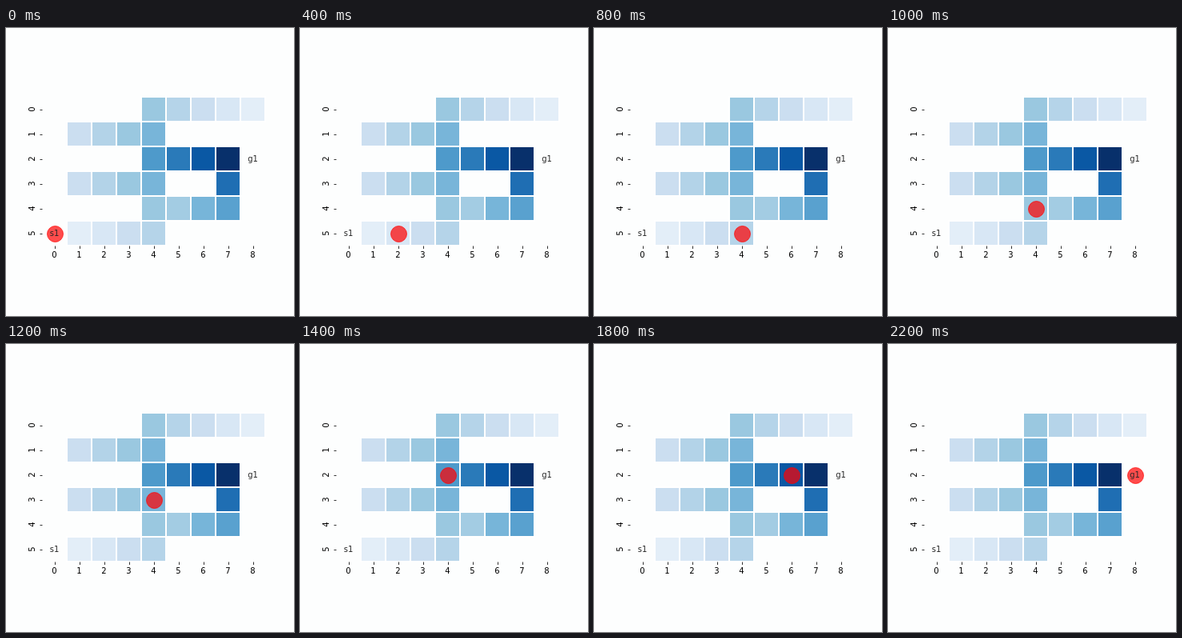
An HTML page for the animation above (2400 ms loop, 360 by 360 pixels).

```html
<!DOCTYPE html>
<html>
<head>
<meta charset="utf-8">
<style>
html, body { margin: 0; width: 100%; height: 100%; overflow: hidden; background: #fdfefe; }
svg { display: block; width: 360px; height: 360px; }
text { font: 10px "DejaVu Sans", sans-serif; text-anchor: middle; }
</style>
</head>
<body>
<svg viewBox="0 0 360 360">
  <g id="grid"></g>
  <circle id="agent" r="10" fill="#f00" fill-opacity=".7" stroke="#f00" stroke-opacity=".7"/>
  <g id="labels"></g>
</svg>
<script>
const CELL = 31, LEFT = 45, TOP = 86, STEP = 200;
const midX = c => LEFT + (c + 0.5) * CELL;
const midY = r => TOP + (r + 0.5) * CELL;

// Each row: first column, then the cell colours
const rows = [
  [4, '#9ac8e0', '#b5d4e9', '#cbdef0', '#d8e7f5', '#e3eef8'],
  [1, '#cbdef0', '#b3d3e8', '#9ac8e0', '#78b5d9'],
  [4, '#4e9acb', '#2a7ab9', '#0a58a4', '#08306b'],
  [1, '#cbdef0', '#b3d3e8', '#9ac8e0', '#78b5d9', null, null, '#1f6eb3'],
  [4, '#9ac8e0', '#a3cce3', '#77b5d9', '#59a1cf'],
  [1, '#e3eef8', '#d8e7f5', '#cbdef0', '#b5d4e9']
];
const path = [[0, 5], [1, 5], [2, 5], [3, 5], [4, 5], [4, 4], [4, 3],
              [4, 2], [5, 2], [6, 2], [7, 2], [8, 2]];

let grid = '', labels = '';
const tick = d => `<path d="${d}" stroke="#000" stroke-width=".8"/>`;

rows.forEach(([first, ...colors], r) => {
  colors.forEach((color, i) => {
    if (!color) return;
    const x = LEFT + (first + i) * CELL, y = TOP + r * CELL;
    grid += `<rect x="${x}" y="${y}" width="31" height="31" fill="${color}" stroke="#fff" stroke-width="2"/>`;
  });
  const y = midY(r);
  labels += tick(`M42.5 ${y + 1}h3`) +
    `<text transform="translate(36 ${y}) rotate(-90)">${r}</text>`;
});
for (let c = 0; c < 9; c++) {
  const x = midX(c);
  labels += tick(`M${x + 1} 272.5v3.5`) + `<text x="${x}" y="287">${c}</text>`;
}
const note = (s, c, r) =>
  `<text x="${midX(c)}" y="${midY(r) + 3.5}" fill="#262626">${s}</text>`;
labels += note('s1', 0, 5) + note('g1', 8, 2);

document.getElementById('grid').innerHTML = grid;
document.getElementById('labels').innerHTML = labels;

const agent = document.getElementById('agent');
function draw() {
  const [c, r] = path[Math.floor(performance.now() / STEP) % path.length];
  agent.setAttribute('cx', midX(c) + 1);
  agent.setAttribute('cy', midY(r) + 1);
  requestAnimationFrame(draw);
}
draw();
</script>
</body>
</html>
```
